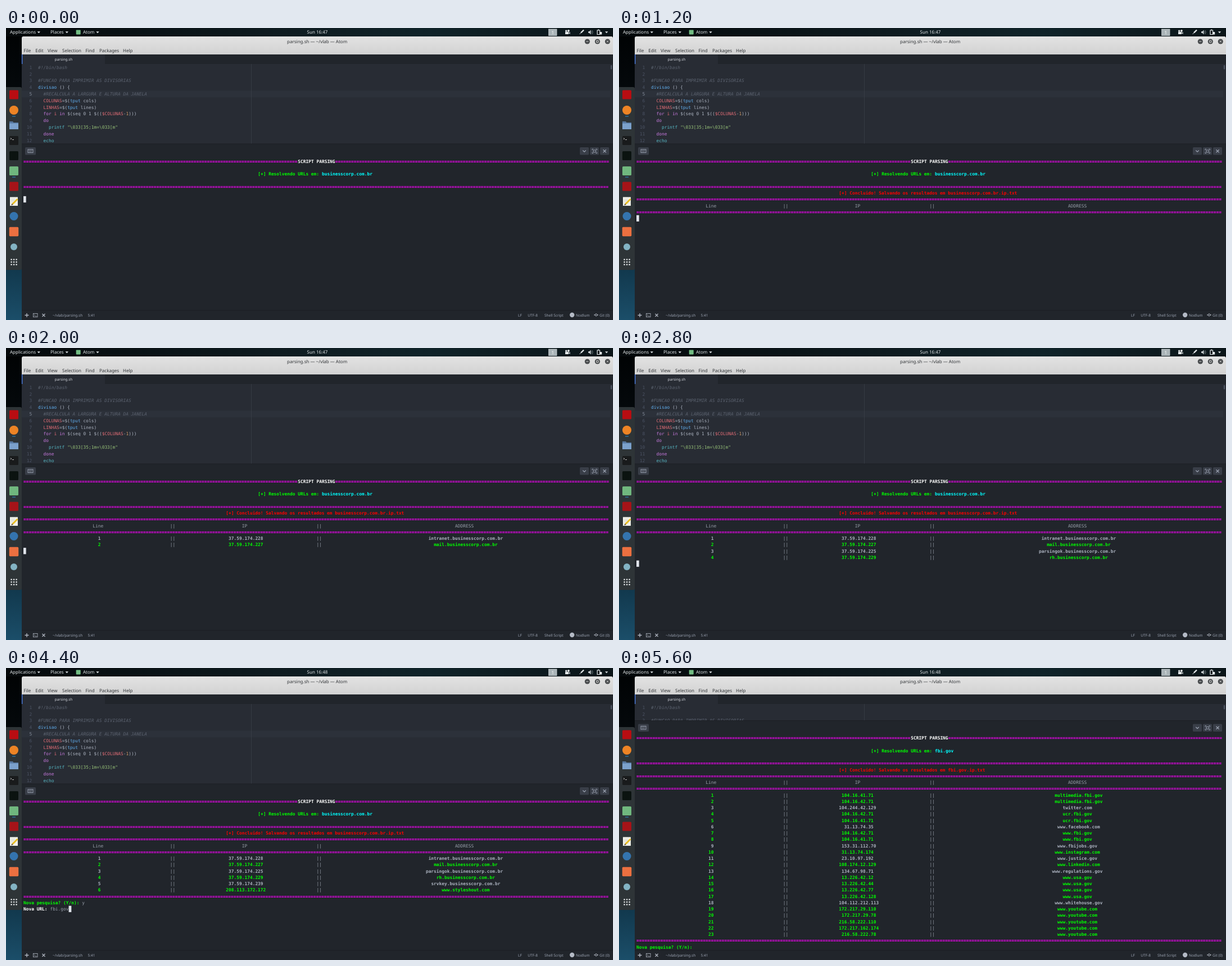
An HTML page that plays this animation: 1080 by 519 pixels, repeating every 6.8 s.

```html
<!DOCTYPE html>
<html lang="en">
<head>
<meta charset="utf-8">
<title>Parsing script</title>
<style>
html, body { margin: 0; width: 100%; height: 100%; overflow: hidden; background: #21252b; }
svg { display: block; width: 100%; height: 100%; }
text { white-space: pre; text-rendering: geometricPrecision; font: 8px "Noto Sans", "Open Sans", sans-serif; }
.mono text { font: 7.875px "DejaVu Sans Mono", monospace; }
.mono .b { font-weight: 700; }
.mono .i { font-style: italic; }
.bar text { font-weight: 500; fill: #e4e8ea; }
.small text { font-size: 6.5px; fill: #9da5b4; }
</style>
</head>
<body>
<svg id="stage" viewBox="0 0 1080 519">
  <defs>
    <linearGradient id="wall" x2="0" y2="1">
      <stop offset="0" stop-color="#000203"/><stop offset=".22" stop-color="#05090c"/>
      <stop offset=".8" stop-color="#103549"/><stop offset="1" stop-color="#1b4e69"/>
    </linearGradient>
    <linearGradient id="top">
      <stop offset="0" stop-color="#05090b"/><stop offset=".45" stop-color="#0e1b20"/>
      <stop offset=".7" stop-color="#102329"/><stop offset="1" stop-color="#0b1519"/>
    </linearGradient>
    <linearGradient id="head" x2="0" y2="1">
      <stop offset="0" stop-color="#e2e2e2"/><stop offset="1" stop-color="#d2d2d2"/>
    </linearGradient>
    <clipPath id="editorClip"><rect x="28" y="64" width="1052" height="142"/></clipPath>
  </defs>
  <rect width="1080" height="519" fill="url(#wall)"/>
  <g id="topbar" class="bar"><rect width="1080" height="15" fill="url(#top)"/></g>
  <g id="dock"><path d="M0 105H25Q28 105 28 108V427Q28 430 25 430H0Z" fill="#2e3437"/></g>
  <g id="frame">
    <path d="M28 47V18Q28 15 31 15H1077Q1080 15 1080 18V47Z" fill="url(#head)"/>
    <rect x="28" y="47" width="1052" height="472" fill="#21252b"/>
    <rect x="28" y="64" width="1052" height="142" fill="#282c34"/>
    <rect x="28" y="47" width="148" height="17" fill="#282c34"/>
    <rect x="28" y="47" width="1.2" height="17" fill="#528bff"/>
  </g>
  <g id="editor" class="mono" clip-path="url(#editorClip)">
    <rect x="28" y="111.3" width="1047" height="11.8" fill="#2c313a"/>
    <rect x="436.2" y="64" width=".7" height="142" fill="#3d424b"/>
    <rect x="1075.8" y="66" width="2.4" height="7.5" rx="1.2" fill="#4d5361"/>
  </g>
  <g id="panel">
    <rect x="28" y="206" width="1052" height="420" fill="#21252b"/>
    <rect x="28" y="205.6" width="1052" height=".7" fill="#181a1f"/>
    <g fill="#393e48">
      <rect x="34" y="212" width="19" height="13.5" rx="1.5"/>
      <rect x="1021" y="212" width="16" height="13.5" rx="1.5"/>
      <rect x="1039" y="212" width="16" height="13.5" rx="1.5"/>
      <rect x="1057" y="212" width="16" height="13.5" rx="1.5"/>
    </g>
    <g fill="none" stroke="#9da5b4" stroke-width=".9">
      <rect x="39" y="215.8" width="9" height="5.8"/>
      <path d="M40.5 217.6H46.7M41 219.8H46" stroke-dasharray="1 .6"/>
      <path d="M1026.3 217.5L1029 220.2L1031.7 217.5" stroke-width="1.2"/>
      <rect x="1045" y="217" width="4.4" height="3.8"/>
      <path d="M1043 217V215.2H1045M1049.4 215.2H1051.4V217M1051.4 220.8V222.6H1049.4M1045 222.6H1043V220.8"/>
      <path d="M1062.5 216.2L1067.7 221.4M1067.7 216.2L1062.5 221.4" stroke-width="1.3"/>
    </g>
    <g id="term" class="mono"></g>
  </g>
  <g id="status" class="small">
    <rect x="28" y="502" width="1052" height="17" fill="#21252b"/>
    <rect x="28" y="501.6" width="1052" height=".7" fill="#181a1f"/>
    <g fill="none" stroke="#b4bac5" stroke-width="1">
      <path d="M33.5 510.5H40.5M37 507V514M64.5 508L69.5 513M69.5 508L64.5 513" stroke-width="1.3"/>
      <rect x="48.5" y="507.5" width="7.5" height="6.2" stroke-width=".8"/>
      <path d="M50 509L51.5 510.5L50 512M52.3 512H54.3" stroke-width=".7"/>
      <circle cx="1050" cy="510" r="1.9"/><path d="M1046 510H1048M1052 510H1054"/>
    </g>
    <circle cx="1007.2" cy="510" r="4.2" fill="#b4bac5"/>
  </g>
</svg>
<script>
const $ = id => document.getElementById(id);

function add(parent, tag, attrs, body) {
  const el = document.createElementNS("http://www.w3.org/2000/svg", tag);
  for (const k in attrs) el.setAttribute(k, attrs[k]);
  if (body !== undefined) el.textContent = body;
  parent.append(el);
  return el;
}
const label = (parent, x, y, body, attrs) => add(parent, "text", { x, y, ...attrs }, body);
const shape = (parent, d, fill) => add(parent, "path", { d, fill });
const line = (parent, d, stroke, width = 1) =>
  add(parent, "path", { d, stroke, fill: "none", "stroke-width": width });
const square = (parent, cx, cy, size, fill) =>
  add(parent, "rect", { x: cx - size / 2, y: cy - size / 2, width: size, height: size, rx: size / 10, fill });

// Desktop bar
const topbar = $("topbar");
label(topbar, 7, 10.4, "Applications");
label(topbar, 79, 10.4, "Places");
label(topbar, 137, 10.4, "Atom");
const clock = label(topbar, 554, 10.4, "", { "text-anchor": "middle" });
for (const x of [58.3, 108.3, 163, 1068.5]) shape(topbar, `M${x - 2.7} 6.2h5.4l-2.7 3z`, "#dfe4e6");
square(topbar, 128.7, 7.4, 8, "#72bd83");
add(topbar, "rect", { x: 965.5, y: 2, width: 14.5, height: 11.5, fill: "#aab4b8", stroke: "#d5dadd", "stroke-width": .7 });
label(topbar, 972.7, 10.7, "1", { "text-anchor": "middle", style: "fill:#fff" });
shape(topbar, "M995 7h6v4h-6zM1001 9l2.5-2v4zM995 5.2a1.7 1.7 0 1 0 3.4 0a1.7 1.7 0 1 0-3.4 0M999 5a1.9 1.9 0 1 0 3.8 0a1.9 1.9 0 1 0-3.8 0", "#e4e8ea");
line(topbar, "M1020.5 11L1024 7.5", "#e4e8ea", 1);
line(topbar, "M1023 8.4L1028 3.5", "#e4e8ea", 2.4);
shape(topbar, "M1036 6h2l2.5-2.5v8l-2.5-2.5h-2z", "#c5cbce");
line(topbar, "M1041.5 5.3q1.6 2.2 0 4.4M1043 4q2.6 3.5 0 7", "#79848a", .8);
line(topbar, "M1052 4H1056.5V11.5H1052ZM1053.2 3H1055.2", "#e4e8ea", 1.2);
shape(topbar, "M1057 7h3.2v4.5h-3.2z", "#e4e8ea");

// Dock
const dock = $("dock");
square(dock, 14, 118.5, 16, "#b80d12");
add(dock, "circle", { cx: 14, cy: 146, r: 8, fill: "#ee8425" });
shape(dock, "M6 166h6l1.5 2h8.5v12h-16z", "#56779f");
shape(dock, "M6 169.5h16v10.5h-16z", "#7ba1cc");
square(dock, 14, 200, 16, "#191b1c");
line(dock, "M8 195.5l1.8 1.3l-1.8 1.3M11 198.5h3", "#eee", .8);
square(dock, 14, 227, 16, "#0b1310");
square(dock, 14, 254, 16, "#70b77e");
square(dock, 14, 281.5, 16, "#a61318");
shape(dock, "M7 300.5h14v15.5h-14z", "#f2f2ea");
line(dock, "M9 304h7M9 306.5h6M9 309h4", "#c4c6c5", .7);
line(dock, "M11.5 313L20.5 304", "#e8bd24", 3);
shape(dock, "M9.3 315.2l1.2-3.3l2.1 2.1z", "#4a4030");
add(dock, "circle", { cx: 14, cy: 334.5, r: 7.5, fill: "#3474ae" });
square(dock, 14, 362, 16.5, "#ec7040");
add(dock, "circle", { cx: 14, cy: 389, r: 6, fill: "#83b4c4" });
for (let i = 0; i < 9; i++)
  add(dock, "circle", { cx: 9.6 + i % 3 * 4.5, cy: 411.5 + Math.floor(i / 3) * 4.5, r: 1.3, fill: "#e6e9ea" });
for (const y of [157, 265]) shape(dock, `M11 ${y - .6}h6v1.2h-6z`, "#2b83ba");

// Window frame
const frame = $("frame");
label(frame, 553.6, 27, "parsing.sh — ~/vlab — Atom", { "text-anchor": "middle", fill: "#303336", "font-weight": 500 , style: "font-weight:500" });
const menu = { File: 31.5, Edit: 52.3, View: 74, Selection: 100, Find: 141.5, Packages: 166, Help: 208 };
for (const name in menu) label(frame, menu[name], 43.3, name, { fill: "#303336" });
for (const x of [1034.3, 1052.3, 1070.3]) add(frame, "circle", { cx: x, cy: 24, r: 4.6, fill: "#474a4c" });
line(frame, "M1032.3 24h4M1050.6 22.3h3.4v3.4h-3.4zM1068.7 22.4l3.2 3.2M1071.9 22.4l-3.2 3.2", "#e5e5e5", .9);
label(frame, 102.5, 58.3, "parsing.sh", { "text-anchor": "middle", style: "font-size:6.4px", fill: "#d7dae0" });

// Status bar
const status = $("status");
const notes = { "~/vlab/parsing.sh": 83, "5:41": 145.5, LF: 911, "UTF-8": 928.3, "Shell Script": 958, Nodlum: 1014, "Git (0)": 1056 };
for (const note in notes) label(status, notes[note], 512.7, note);

// Editor: each piece is a colour key followed by its text
const CELL = 7.875 * 1233 / 2048;
const ink = { c: "#5c6370", f: "#61afef", n: "#abb2bf", r: "#e06c75", p: "#c678dd", s: "#98c379", k: "#56b6c2", o: "#d19a66" };
const code = [
  ["c#!/bin/bash"],
  [],
  ["c#FUNCAO PARA IMPRIMIR AS DIVISORIAS"],
  ["fdivisao", "n () {"],
  ["c  #RECALCULA A LARGURA E ALTURA DA JANELA"],
  ["r  COLUNAS", "n=$(", "ftput", "n cols)"],
  ["r  LINHAS", "n=$(", "ftput", "n lines)"],
  ["p  for", "r i", "p in", "n $(seq 0 1 $((", "r$COLUNAS", "n-", "o1", "n)))"],
  ["p  do"],
  ["k    printf", "s \"\\033[35;1m=\\033[m\""],
  ["p  done"],
  ["k  echo"]
];
code.forEach((parts, i) => {
  const y = 72.8 + i * 11.8125;
  label($("editor"), 46.3, y, i + 1, { "text-anchor": "end", fill: i === 4 ? "#858d9b" : "#4b5364" });
  let col = 0;
  for (const part of parts) {
    const body = part.slice(1);
    label($("editor"), 57 + col * CELL, y, body, { fill: ink[part[0]], class: part[0] === "c" ? "i" : "" });
    col += body.length;
  }
});

// Terminal
const ROW = 11.25, LEFT = 31, TOP = 231.4;
const GREEN = "#00ff00", GREY = "#abb2bf", DIM = "#989faa", PINK = "#ff00ff";
const term = $("term");

const write = (row, col, body, fill, bold = true) =>
  label(term, LEFT + col * CELL, TOP + row * ROW + 8.4, body, { fill, class: bold ? "b" : "" });
const rule = row => write(row, 0, "=".repeat(220), PINK);
const cursor = (row, col) =>
  add(term, "rect", { x: LEFT + col * CELL, y: TOP + row * ROW, width: CELL, height: ROW, fill: "#dfe3ea" });

const corp = {
  site: "businesscorp.com.br",
  grey: [1, 3, 5],
  hosts: `37.59.174.228 intranet.@
37.59.174.227 mail.@
37.59.174.225 parsingok.@
37.59.174.229 rh.@
37.59.174.239 srvkey.@
208.113.172.172 www.styleshout.com`
};
const gov = {
  site: "fbi.gov",
  grey: [3, 6, 9, 11, 13, 18],
  hosts: `104.16.41.71 multimedia.@
104.16.42.71 multimedia.@
104.244.42.129 twitter.com
104.16.42.71 ucr.@
104.16.41.71 ucr.@
31.13.74.35 www.facebook.com
104.16.42.71 www.@
104.16.41.71 www.@
153.31.112.70 www.fbijobs.gov
31.13.74.174 www.instagram.com
23.10.97.192 www.justice.gov
108.174.12.129 www.linkedin.com
134.67.98.71 www.regulations.gov
13.226.42.12 www.usa.gov
13.226.42.44 www.usa.gov
13.226.42.77 www.usa.gov
13.226.42.128 www.usa.gov
104.112.212.113 www.whitehouse.gov
172.217.29.110 www.youtube.com
172.217.29.78 www.youtube.com
216.58.222.110 www.youtube.com
172.217.162.174 www.youtube.com
216.58.222.78 www.youtube.com`
};
for (const scan of [corp, gov])
  scan.rows = scan.hosts.replaceAll("@", scan.site).split("\n").map(s => s.split(" "));

function bars(row) {
  write(row, 55, "||", DIM, false);
  write(row, 110, "||", DIM, false);
}

function intro(scan) {
  const side = "=".repeat(103);
  write(0, 0, side, PINK);
  write(0, 103, "SCRIPT PARSING", "#fff");
  write(0, 117, side, PINK);
  write(2, 88, "[+] Resolvendo URLs em:", GREEN);
  write(2, 112, scan.site, "#00ffff");
  rule(4);
}

function table(scan, count) {
  write(5, 76, `[+] Concluido! Salvando os resultados em ${scan.site}.ip.txt`, "#ff0000");
  rule(6);
  write(7, 26, "Line", DIM, false);
  write(7, 82, "IP", DIM, false);
  write(7, 162, "ADDRESS", DIM, false);
  bars(7);
  rule(8);
  scan.rows.slice(0, count).forEach(([ip, host], i) => {
    const row = 9 + i, n = String(i + 1);
    const fill = scan.grey.includes(i + 1) ? GREY : GREEN;
    write(row, 29 - n.length, n, fill);
    write(row, 83 - Math.floor(ip.length / 2), ip, fill);
    write(row, 166 - Math.ceil(host.length / 2), host, fill);
    bars(row);
  });
}

function ask(scan) {
  const end = 9 + scan.rows.length;
  rule(end);
  write(end + 1, 0, "Nova pesquisa? (Y/n):", GREEN);
}

const steps = [
  { at: 0, scan: corp },
  { at: 1200, scan: corp, count: 0 },
  { at: 1600, scan: corp, count: 1 },
  { at: 2000, scan: corp, count: 2 },
  { at: 2400, scan: corp, count: 3 },
  { at: 2800, scan: corp, count: 4 },
  { at: 3200, scan: corp, count: 6, asked: true },
  { at: 4400, scan: corp, count: 6, asked: true, reply: true },
  { at: 5600, scan: gov, count: 23, asked: true }
];
const LOOP = 6800;
let shown;

function draw(t) {
  const step = steps.findLast(s => s.at <= t);
  if (step === shown) return;
  shown = step;
  const { scan, count, asked, reply } = step;
  term.replaceChildren();
  clock.textContent = t < 4400 ? "Sun 16:47" : "Sun 16:48";
  $("panel").setAttribute("transform", `translate(0 ${scan === gov ? -112.5 : 0})`);
  intro(scan);
  if (count === undefined) return cursor(6, 0);
  table(scan, count);
  if (!asked) return cursor(9 + count, 0);
  ask(scan);
  if (reply) {
    write(16, 22, "y", DIM, false);
    write(17, 0, "Nova URL:", "#fff");
    write(17, 10, gov.site, DIM, false);
    cursor(17, 17);
  } else if (scan === corp) cursor(16, 22);
}

const start = performance.now();
function tick() {
  draw((performance.now() - start) % LOOP);
  requestAnimationFrame(tick);
}
tick();
</script>
</body>
</html>
```
